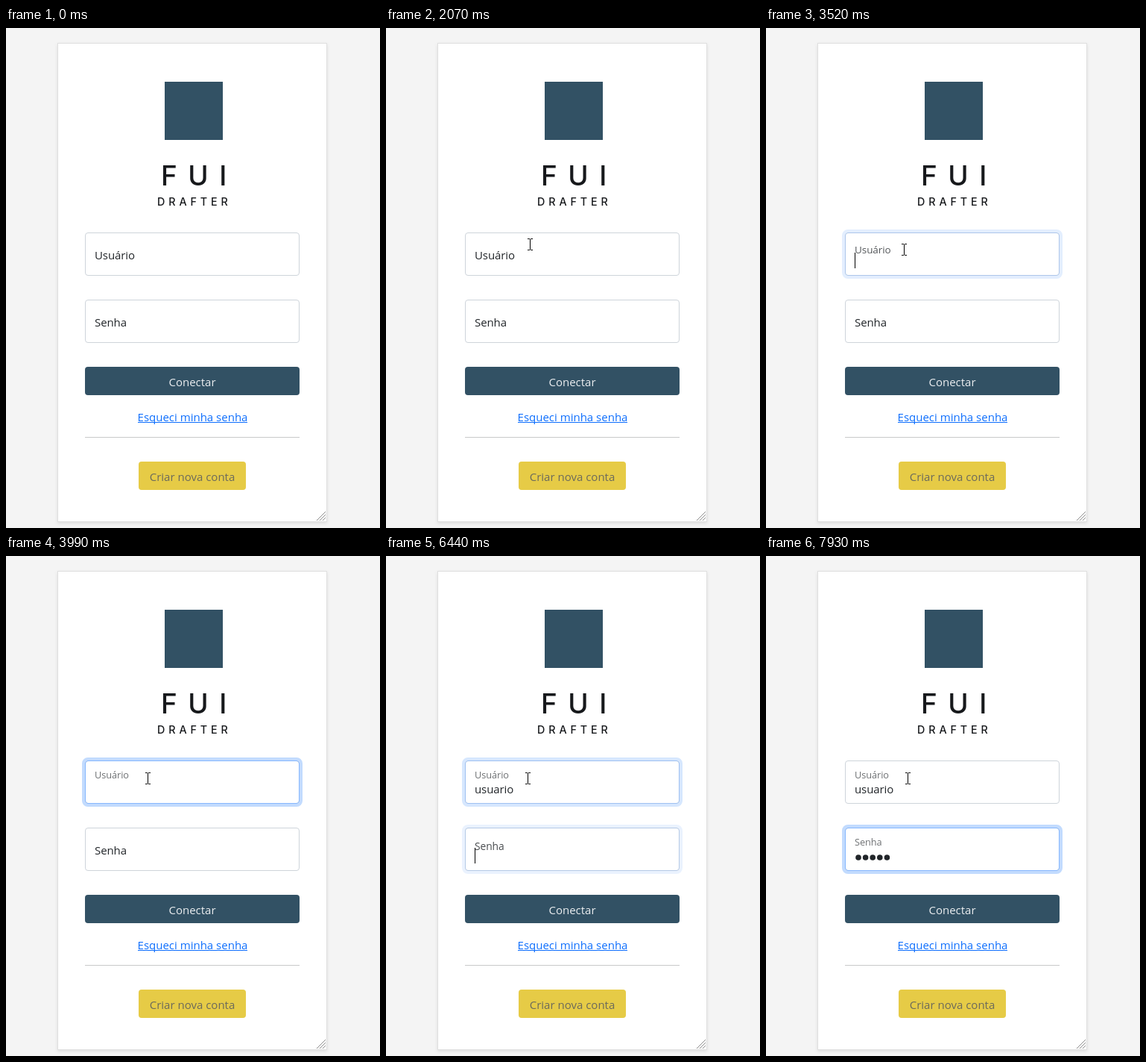
An HTML page that plays this animation: 502 by 670 pixels, repeating every 8000 ms.

```html
<!DOCTYPE html>
<html lang="pt">
<head>
<meta charset="utf-8">
<title>Login</title>
<style>
  html, body { margin: 0; width: 100%; height: 100%; overflow: hidden; background: #f4f4f4; }
  svg { display: block; width: 502px; height: 670px; font: 15px "Open Sans", "Noto Sans", sans-serif; fill: #212529; }
  .card { fill: #fff; stroke: #dfdfdf; filter: drop-shadow(0 2px 2px rgba(0, 0, 0, .09)); }
  .brand { font-family: Inter, sans-serif; font-weight: 500; fill: #17191c; }
  .mid { text-anchor: middle; }
  .frame { fill: #fff; stroke: #ced4da; }
  .glow rect { fill: none; stroke: #86b7fe; }
  .glow .ring { stroke: #c2dbfe; stroke-width: 4; }
  .label, .value { letter-spacing: -.1px; }
  .crisp { shape-rendering: crispEdges; }
</style>
</head>
<body>
<svg viewBox="0 0 502 670">
  <rect class="card" x="69.5" y="20.5" width="361" height="641"/>
  <path d="M417 660l12-12M421 660l8-8M425 660l4-4" fill="none" stroke="#8c8c8c"/>

  <rect x="213" y="72" width="78" height="78" fill="#325164"/>
  <text class="brand" x="208" y="211" font-size="37" letter-spacing="14.5">FUI</text>
  <text class="brand" x="203" y="238" font-size="14.3" letter-spacing="4.9">DRAFTER</text>

  <g id="fields"></g>

  <rect x="106" y="454" width="288" height="38" rx="4" fill="#325164"/>
  <text class="mid" x="250" y="480" fill="#eceef0">Conectar</text>
  <text class="mid" x="250.5" y="527" fill="#0d6efd">Esqueci minha senha</text>
  <path class="crisp" d="M177 528.5h147" stroke="#0d6efd"/>
  <path class="crisp" d="M106 548.5h288" stroke="#c8c9ca"/>
  <rect x="178" y="581" width="144" height="38" rx="4" fill="#e6cb46"/>
  <text class="mid" x="250" y="607" fill="#6b6a5c">Criar nova conta</text>

  <rect id="caret" class="crisp" width="1" height="21" fill="#000"/>
  <path id="arrow" d="M.5 .5V16.5L4.2 13 6.6 18.5 8.9 17.5 6.5 12H11.5Z" fill="#fff" stroke="#000"/>
  <path id="beam" class="crisp" d="M-3.5-7.5h3m1 0h3M0-7V7M-3.5 7.5h3m1 0h3" fill="none" stroke="#000"/>
  <circle id="click" cx="183.5" cy="296" r="12" fill="#ff0" fill-opacity=".5"/>
</svg>
<script>
const LOOP = 8000, BLINK = 510, KEY_GAP = 200, DOT = 9.6;
const LEFT = 106, WIDTH = 288, HEIGHT = 58;
const CLICK = 3160;

// Each move eases from the previous point; bend lifts the middle of the way
const moves = [
  { at: 390, dur: 0, x: 450, y: 655 },
  { at: 390, dur: 460, x: 349.5, y: 406 },
  { at: 1470, dur: 0, x: 274, y: 363 },
  { at: 2070, dur: 0, x: 193.5, y: 290 },
  { at: 2380, dur: 610, x: 185.5, y: 297, bend: 18 },
  { at: 3560, dur: 100, x: 190.5, y: 298 }
];

const $ = id => document.getElementById(id);
const show = (el, on) => el.setAttribute('visibility', on ? 'visible' : 'hidden');
const clamp = (v, max = 1) => Math.min(max, Math.max(0, v));
const ease = (t, at, dur) => {
  const p = clamp((t - at) / dur);
  return p * p * (3 - 2 * p);
};

function makeField({ y, name, focus, blur, keyAt, word, masked }) {
  const g = document.createElementNS('http://www.w3.org/2000/svg', 'g');
  g.setAttribute('transform', `translate(${LEFT} ${y})`);
  g.innerHTML = `
    <rect class="frame" x=".5" y=".5" width="287" height="57" rx="3.5"/>
    <g class="glow">
      <rect class="ring" x="-2" y="-2" width="292" height="62" rx="6"/>
      <rect x=".5" y=".5" width="287" height="57" rx="3.5"/>
    </g>
    <text class="label" x="13" y="36">${name}</text>
    <text class="value" x="13" y="44"></text>
    <g class="dots"></g>`;
  $('fields').append(g);
  const [glow, label, value, dots] =
    ['.glow', '.label', '.value', '.dots'].map(s => g.querySelector(s));

  function type(n) {
    if (masked) {
      dots.innerHTML = Array.from({ length: n }, (_, i) =>
        `<circle cx="${18 + DOT * i}" cy="40" r="3.8"/>`).join('');
      return DOT * n;
    }
    value.textContent = word.slice(0, n);
    return n ? value.getComputedTextLength() : 0;
  }

  return {
    y, focus, blur,
    render(t) {
      const lift = ease(t, focus, 100);
      glow.setAttribute('opacity', ease(t, focus, 130) * (1 - ease(t, blur, 130)));
      label.setAttribute('opacity', 1 - .35 * lift);
      label.setAttribute('transform',
        `translate(${2.04 * lift} ${-6.8 * lift}) scale(${1 - .15 * lift})`);
      const typed = clamp(Math.floor((t - keyAt) / KEY_GAP) + 1, word.length);
      const width = type(typed);

      if (t < focus || t >= blur) return;
      show($('caret'), Math.floor((t - focus) / BLINK) % 2 === 0);
      $('caret').setAttribute('x', Math.floor(LEFT + 13 + width));
      $('caret').setAttribute('y', y + 27);
    }
  };
}

const fields = [
  { y: 274, name: 'Usuário', focus: 3460, blur: 6390, keyAt: 4660, word: 'usuario' },
  { y: 364, name: 'Senha', focus: 6390, blur: Infinity, keyAt: 7130, word: 'senha', masked: true }
].map(makeField);

function pointerAt(t) {
  let pos = null;
  for (const { at, dur, x, y, bend = 0 } of moves) {
    if (t < at) break;
    const p = dur ? ease(t, at, dur) : 1;
    const from = pos || { x, y };
    pos = {
      x: from.x + (x - from.x) * p,
      y: from.y + (y - from.y) * p - bend * Math.sin(Math.PI * p)
    };
  }
  return pos;
}

function renderPointer(t) {
  const pos = pointerAt(t);
  const inField = !!pos && pos.x > LEFT && pos.x < LEFT + WIDTH &&
    fields.some(f => pos.y >= f.y && pos.y < f.y + HEIGHT);
  show($('beam'), inField);
  show($('arrow'), pos && !inField);
  if (pos) {
    const x = inField ? Math.floor(pos.x) + .5 : Math.round(pos.x);
    $(inField ? 'beam' : 'arrow')
      .setAttribute('transform', `translate(${x} ${Math.round(pos.y)})`);
  }
  show($('click'), t >= CLICK && t < CLICK + 360);
}

function render(t) {
  show($('caret'), false);
  fields.forEach(f => f.render(t));
  renderPointer(t);
}

const start = performance.now();
function tick() {
  render((performance.now() - start) % LOOP);
  requestAnimationFrame(tick);
}
tick();
</script>
</body>
</html>
```
